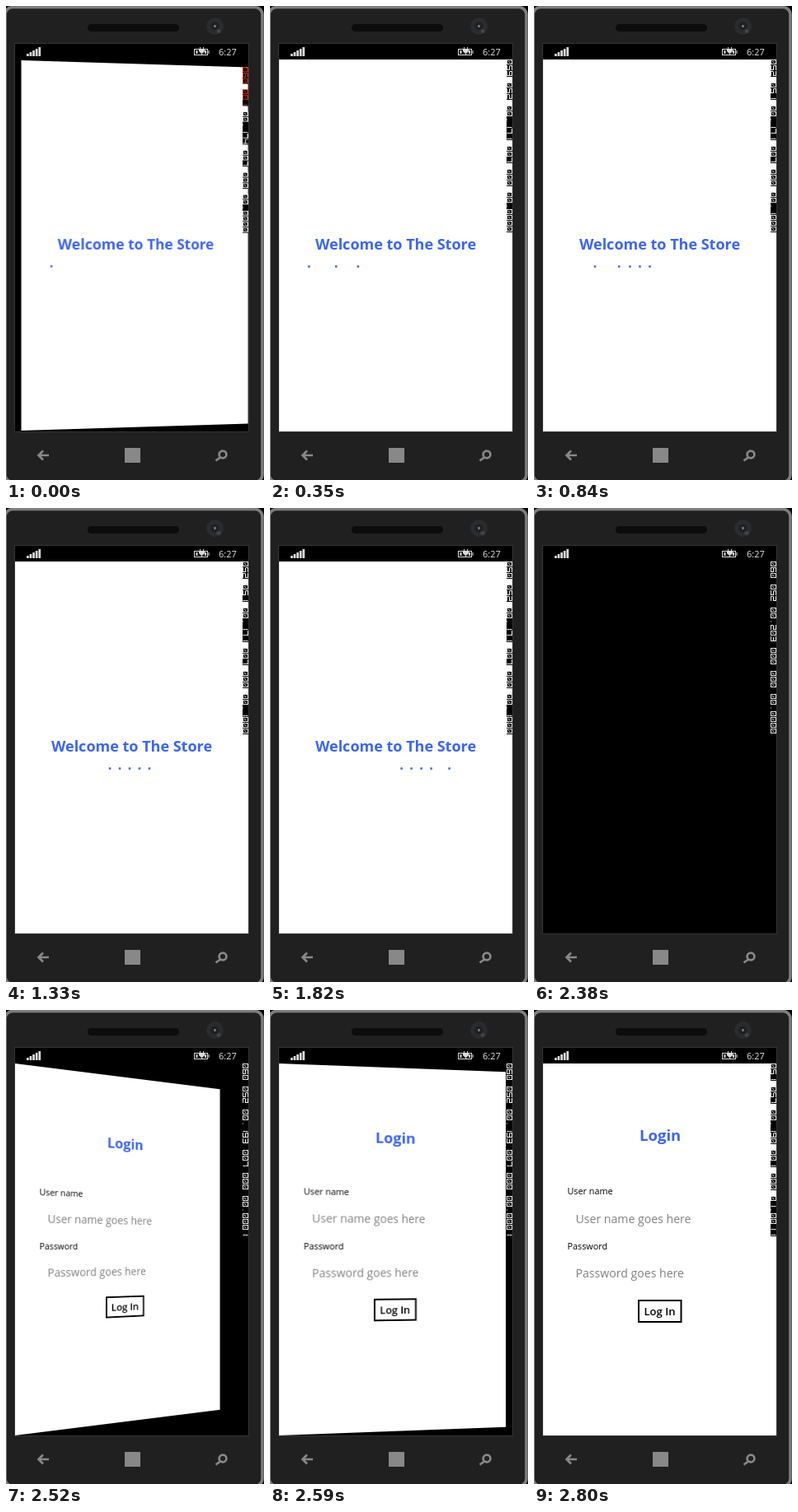
Recreate the animation shown at these times as an HTML page. Size 313 by 576 pixels, loop 5530 ms.

```html
<!DOCTYPE html>
<html lang="en">
<head>
<meta charset="utf-8">
<title>Store app</title>
<style>
  html, body { margin: 0; width: 100%; height: 100%; overflow: hidden; background: #000; }
  #phone { position: absolute; left: 0; top: 0; width: 313px; height: 576px; overflow: hidden; }
  #phone > svg { position: absolute; left: 0; top: 0; }
  #screen { position: absolute; left: 11px; top: 65px; width: 283px; height: 452px;
    overflow: hidden; perspective: 610px; perspective-origin: 50% 50%; }
  #screen svg { position: absolute; left: 0; top: 0; width: 283px; height: 452px;
    transform-origin: 0 50%; }
  text { font-family: "Open Sans", "Noto Sans", sans-serif; }
  .page { background: #fff; }
  .title { font-weight: 700; fill: #3b64f5; text-anchor: middle; }
  .label { font-size: 10.8px; }
  .hint { font-size: 14.1px; fill: #808080; }
</style>
</head>
<body>
<div id="phone">
  <svg width="313" height="576" viewBox="0 0 313 576">
    <rect x="-1" y="1.5" width="312" height="577" rx="9" fill="#202020" stroke="#7c7e7e" stroke-width="3.600"/>
    <rect x="99" y="22" width="111" height="9" rx="4.500" fill="#0c0c0c"/>
    <circle cx="253.500" cy="24.500" r="10.500" fill="#2a2b2d"/>
    <circle cx="253.500" cy="24.500" r="5" fill="#1f2022"/>
    <circle cx="258" cy="30.500" r="2.500" fill="#414346"/>
    <rect x="252.500" y="23" width="2" height="3" fill="#8a8a8a"/>
    <rect x="10.500" y="45.500" width="284" height="472" fill="#000" stroke="#343434"/>
    <g id="signal" fill="#dcdcdc"></g>
    <g fill="none" stroke="#dcdcdc">
      <rect x="228.500" y="52.500" width="16" height="7"/>
      <path d="M246 54v4M235.500 50v3M239.500 50v3M237.500 57v3"/>
      <path d="M231.500 54v4M242 54v4" stroke-width="2"/>
      <path d="M234.500 53h6v2l-2 2h-2l-2-2z" fill="#dcdcdc"/>
    </g>
    <text x="258" y="59.500" font-size="11" fill="#e4e4e4">6:27</text>
    <g fill="none" stroke="#888" stroke-width="2.700">
      <path d="M39 546H52M45 540.500l-5.500 5.500l5.500 5.500"/>
      <circle cx="263" cy="545" r="4.400"/>
      <path d="M260 548.500l-5.500 4"/>
    </g>
    <rect x="144" y="537" width="19" height="18" fill="#888"/>
  </svg>

  <div id="screen">
    <svg id="welcome" class="page" viewBox="11 65 283 452">
      <text class="title" x="152.500" y="296" font-size="18">Welcome to The Store</text>
      <g id="dots" fill="#3f63ea"></g>
    </svg>
    <svg id="login" class="page" viewBox="11 65 283 452">
      <text class="title" x="153.200" y="159" font-size="18.500">Login</text>
      <text class="label" x="40.500" y="224">User name</text>
      <text class="hint" x="50.500" y="258.500">User name goes here</text>
      <text class="label" x="40.500" y="291">Password</text>
      <text class="hint" x="50.500" y="325.300">Password goes here</text>
      <rect x="127" y="353" width="51.500" height="26" fill="none" stroke="#000" stroke-width="2"/>
      <text x="152.500" y="371" font-size="13" font-weight="600" text-anchor="middle">Log In</text>
    </svg>
    <svg id="meter" viewBox="11 65 283 452">
      <g id="readout" transform="translate(294 65) rotate(90)" fill="none"></g>
    </svg>
  </div>
</div>

<script>
const LOOP = 5530, STEP = 70;
const LEAVE = 2110, GONE = 2380, ARRIVE = 2440, LOGIN = 2520;
const $ = id => document.getElementById(id);
const welcome = $('welcome'), login = $('login'), meter = $('meter'), readout = $('readout');
const clamp = u => Math.min(1, Math.max(0, u));

const SVG = 'http://www.w3.org/2000/svg';
function add(parent, tag, attrs) {
  const el = parent.appendChild(document.createElementNS(SVG, tag));
  for (const k in attrs) el.setAttribute(k, attrs[k]);
  return el;
}

for (let i = 0; i < 5; i++) {
  const h = 3 + i * 2;
  add($('signal'), 'rect', { x: 25 + i * 3.6, y: 61 - h, width: 2.7, height: h });
}
const dots = Array.from({ length: 5 }, () =>
  add($('dots'), 'rect', { y: 315.3, width: 2.5, height: 2.5 }));

// Page turn: exponential ease, fast in and slow to settle, or the reverse.
const turnIn = u => 1 - (1 - Math.exp(-6 * clamp(u))) / (1 - Math.exp(-6));
const turnOut = u => (Math.exp(6 * clamp(u)) - 1) / (Math.exp(6) - 1);

// Progress dot: quick entry, slow middle third, quick exit.
function dotX(s) {
  const bend = 0.2, third = 94.5, slow = 1.38;
  if (s < 0.5) {
    const u = s / 0.5;
    return 11 + third * (u + bend * u * (1 - u));
  }
  if (s < 0.5 + slow) return 11 + third * (1 + (s - 0.5) / slow);
  const u = (s - 0.5 - slow) / 0.5;
  return 11 + third * (2 + u - bend * u * (1 - u));
}

// Sideways performance readout, drawn with seven segments per digit.
const SEGMENTS = ['M0 .5h6', 'M5.5 .5v3', 'M5.5 3.5v3', 'M0 6.5h6', 'M.5 3.5v3', 'M.5 .5v3', 'M1 3.5h5'];
const DIGITS = ['012345', '12', '01346', '01236', '1256', '02356', '023456', '012', '0123456', '012356'];
const READINGS = [
  [0, '060 001 00.174 007 000 00.0000'],
  [210, '059 052 00.171 007 000 00.0000'],
  [700, '052 051 00.171 007 000 00.1000'],
  [1750, '050 052 00.171 007 000 00.1000'],
  [2310, '050 052 00.171 000 000 01.0011'],
  [2380, '060 052 00.203 000 000 00.0000'],
  [2520, '060 052 00.193 007 000 00.0001'],
  [2660, '051 057 00.190 001 000 01.0011']
];

function glyph(c) {
  if (c === '.') return 'M2.5 6.5h1';
  return [...DIGITS[c]].map(i => SEGMENTS[i]).join('') + (c === '0' ? 'M2 5L4 2.500' : '');
}

let shown;
function drawReadout(t) {
  const reading = READINGS.filter(r => r[0] <= t).pop();
  if (reading === shown) return;
  shown = reading;
  readout.replaceChildren();
  let col = 0;
  reading[1].split(' ').forEach((group, n) => {
    add(readout, 'rect', { x: col * 7, y: 0, width: group.length * 7, height: 7, fill: '#000' });
    const stroke = reading[0] === 0 && n < 2 ? '#d0321e' : '#f0f0f0';
    for (const c of group) {
      add(readout, 'path', { d: glyph(c), stroke, transform: `translate(${col * 7} 0)` });
      col++;
    }
    col++;
  });
}

function pose(el, angle, shift = 0) {
  el.style.transform = Math.abs(angle) < 0.02 ? 'none' :
    `translate3d(${shift}px, 0, ${-shift * 0.37}px) rotateY(${angle}deg)`;
}

function render(t) {
  welcome.style.display = t < GONE ? '' : 'none';
  login.style.display = t >= LOGIN ? '' : 'none';

  const opening = turnIn((t + 160) / 350);
  const leaving = turnOut((t - LEAVE) / 250);
  pose(welcome, 80 * opening - 50 * leaving, 112 * opening);
  pose(meter, 80 * opening, 112 * opening);
  pose(login, 80 * turnIn((t - ARRIVE) / 350));

  dots.forEach((dot, i) => {
    const s = t / 1000 + 0.17 - i * 0.175;
    dot.setAttribute('x', dotX(s) - 1.25);
    dot.style.display = s >= 0 && s < 2.38 && t < 2310 ? '' : 'none';
  });
  drawReadout(t);
}

const start = performance.now();
function tick() {
  const t = (performance.now() - start) % LOOP;
  render(Math.floor(t / STEP) * STEP);
  requestAnimationFrame(tick);
}
tick();
</script>
</body>
</html>
```
